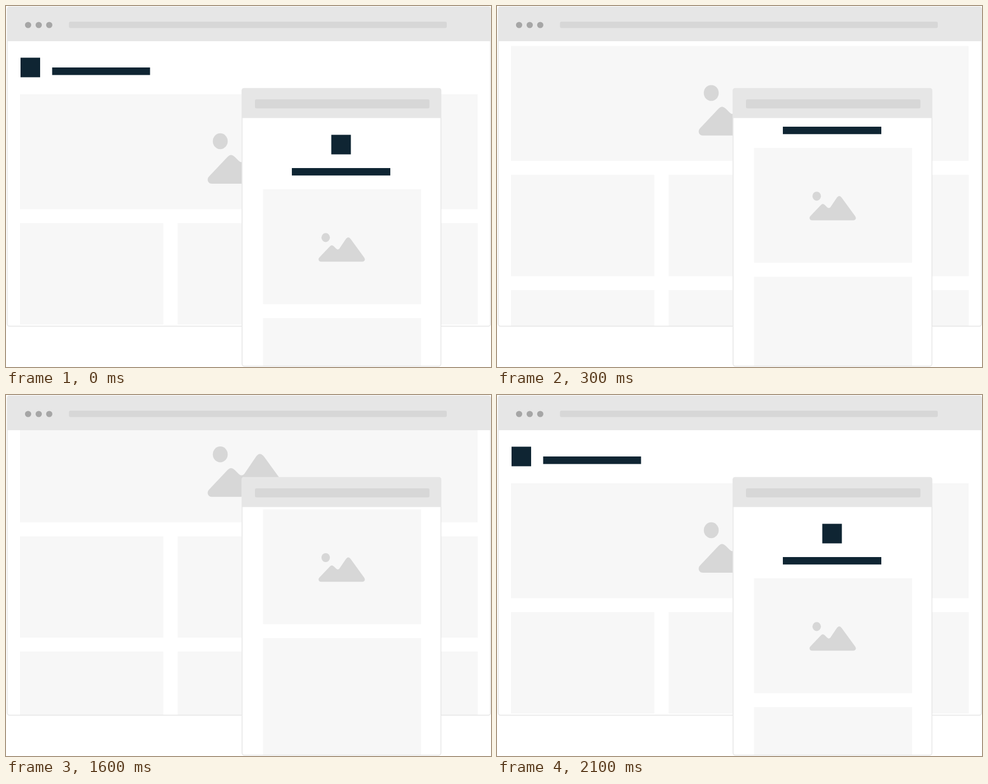
These frames come from a looping animation (867x646 px, 4100 ms). An HTML page:

```html
<!DOCTYPE html>
<html lang="en">
<head>
<meta charset="utf-8">
<title>Scrolling page layouts</title>
<style>
  html, body { margin: 0; width: 100%; height: 100%; overflow: hidden; background: #fff; }
  svg { display: block; width: 867px; height: 646px; }
  .tile { fill: #f7f7f7; }
  .navy { fill: #0f2533; }
  .chrome { fill: #e6e6e6; }
  .field { fill: #d7d7d7; }
  .frame { fill: none; stroke: #e6e6e6; stroke-width: 1.5; }
</style>
</head>
<body>
<svg viewBox="0 0 867 646">
  <defs>
    <clipPath id="wideView"><rect x="2" y="63" width="864" height="510"/></clipPath>
    <clipPath id="slimView"><rect x="422" y="200.5" width="356" height="444"/></clipPath>
    <g id="picture" class="field">
      <ellipse cx="22" cy="-76" rx="13.3" ry="14.2"/>
      <path d="M7 0C0 0-3-8 2-13L35-48Q41-55 48-48L55-41Q60-36 65-41L86-72Q93-82 101-71L143-13C148-6 144 0 138 0Z"/>
    </g>
  </defs>

  <!-- Wide window -->
  <g clip-path="url(#wideView)">
    <g id="wide">
      <rect class="navy" x="26" y="92.5" width="35" height="35"/>
      <rect class="navy" x="82.5" y="110" width="175" height="13.5"/>
      <rect class="tile" x="25" y="158" width="818" height="205.5"/>
      <use href="#picture" x="361" y="318"/>
      <g id="grid" class="tile"></g>
    </g>
  </g>
  <path class="chrome" d="M2 63V5Q2 1 6 1H862Q866 1 866 5V63Z"/>
  <g fill="#a6a6a6">
    <circle cx="39.5" cy="34" r="5.6"/>
    <circle cx="58.5" cy="34" r="5.6"/>
    <circle cx="77.3" cy="34" r="5.6"/>
  </g>
  <rect class="field" x="112.5" y="28" width="675.5" height="11.5" rx="3"/>
  <rect class="frame" x="2.3" y="1.7" width="863.7" height="571.4" rx="4"/>

  <!-- Slim window -->
  <rect x="421.5" y="147" width="356.5" height="498" rx="4" fill="#fff"/>
  <g clip-path="url(#slimView)">
    <g id="slim">
      <rect class="navy" x="581.5" y="230.5" width="35" height="35"/>
      <rect class="navy" x="511" y="290" width="176" height="13.3"/>
      <rect class="tile" x="459.5" y="328" width="282.5" height="205.5"/>
      <use href="#picture" transform="translate(559 457.5) scale(.568)"/>
      <rect class="tile" x="459.5" y="558.5" width="282.5" height="300"/>
    </g>
  </g>
  <path class="chrome" d="M421.5 200.5V151Q421.5 147 425.5 147H774Q778 147 778 151V200.5Z"/>
  <rect class="field" x="445" y="167" width="312" height="16.3" rx="3"/>
  <rect class="frame" x="422" y="147.6" width="355.5" height="496.9" rx="4"/>
</svg>
<script>
  const LOOP = 4100, STEP = 24.67;
  const el = id => document.getElementById(id);

  for (const y of [388.5, 594.7])
    for (const x of [25, 306.7, 587])
      el("grid").innerHTML += `<rect x="${x}" y="${y}" width="256.3" height="181.5"/>`;

  const scroll = (id, steps) =>
    el(id).setAttribute("transform", `translate(0 ${-steps * STEP})`);

  function draw(now) {
    const tick = Math.floor((now % LOOP) / 100);
    const n = tick < 15 ? Math.min(6, tick) : Math.max(0, 21 - tick);
    scroll("slim", n);
    scroll("wide", n < 3 ? n : n + 0.5); // the wide page skips half a step midway
    requestAnimationFrame(draw);
  }
  draw(0);
</script>
</body>
</html>
```
